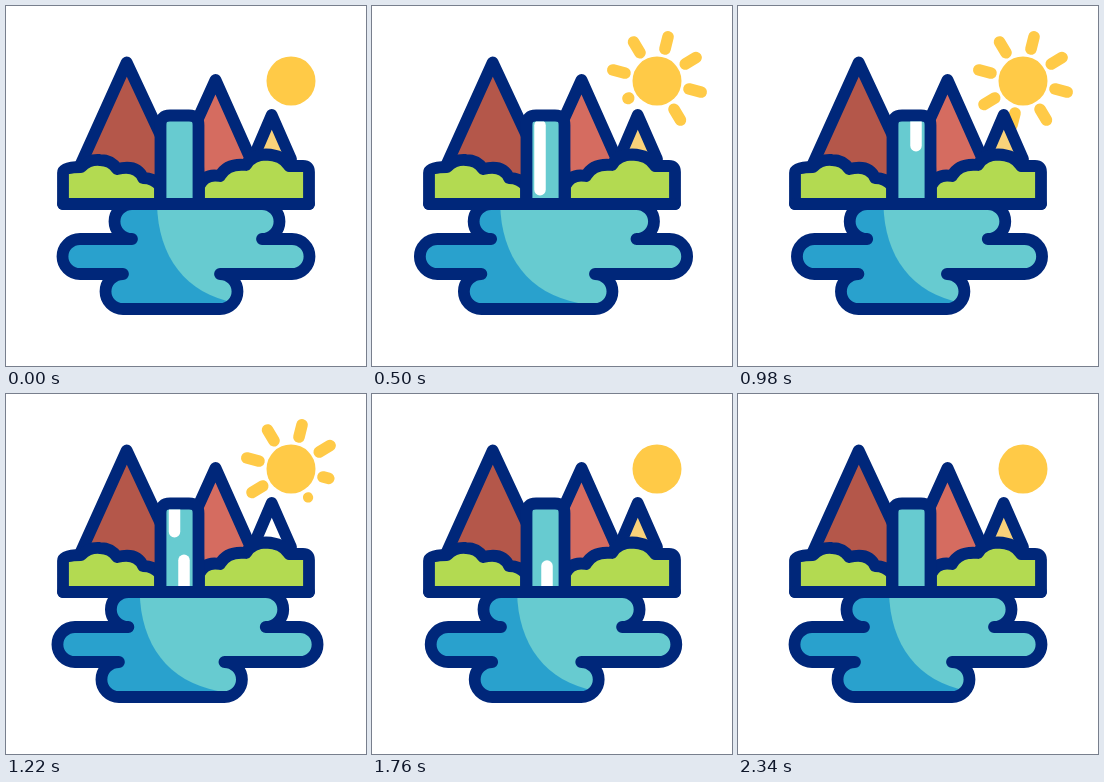
Recreate the animation shown at these times as an HTML page. Size 360 by 360 pixels, loop 2.4 s.

```html
<!DOCTYPE html>
<html lang="en">
<head>
<meta charset="utf-8">
<title>Waterfall</title>
<style>
  html, body { margin: 0; width: 100%; height: 100%; overflow: hidden; background: #fff; }
  svg { display: block; width: 100vw; height: 100vh; }
  .line { stroke: #00277a; stroke-width: 11.8; stroke-linecap: round; stroke-linejoin: round; }
</style>
</head>
<body>
<svg viewBox="0 0 360 360">
  <defs>
    <clipPath id="lake"><path id="lakeClip"/></clipPath>
    <clipPath id="fall"><rect x="160.500" y="115.500" width="26" height="77" rx="3"/></clipPath>
  </defs>
  <g id="sun" stroke="#ffca47" stroke-linecap="round">
    <circle cx="285" cy="75" r="24.5" fill="#ffca47" stroke="none"/>
  </g>
  <g class="line">
    <path fill="#b4574a" d="M74 160 120.700 56.500 155 130V185Z"/>
    <path fill="#d56c60" d="M190.500 116 209.500 74 246 156 193 185Z"/>
    <path id="peak" d="M246 155 265.700 109 285 153Z"/>
    <path fill="#b3da51" d="M57 198V167Q57 161 75 161Q83 153 94 154Q105 154 111 163Q131 158 137 172Q148 172 154 180V198Z"/>
    <path fill="#b3da51" d="M193 198V180Q199 167 214 170Q221 157 240 159Q246 148.500 260 148.500Q277 149 283 160H297Q303 160 303 166V198Z"/>
    <path fill="#67cbd0" d="M154.500 198V119Q154.500 109.500 164 109.500H183Q192.500 109.500 192.500 119V198Z"/>
  </g>
  <g id="streaks" clip-path="url(#fall)" stroke="#fff" stroke-width="11.500" stroke-linecap="round"></g>
  <g clip-path="url(#lake)">
    <rect x="30" y="190" width="300" height="120" fill="#29a1cd"/>
    <path id="light" fill="#67cbd0"/>
  </g>
  <path id="shore" class="line" fill="none"/>
  <path class="line" d="M57 198H303"/>
</svg>
<script>
const LOOP = 2400;
const $ = id => document.getElementById(id);
const clamp = v => Math.max(0, Math.min(1, v));
const smooth = v => (1 - Math.cos(Math.PI * clamp(v))) / 2;

function addLine(parent) {
  const line = document.createElementNS('http://www.w3.org/2000/svg', 'line');
  return parent.appendChild(line);
}
function setAttrs(el, attrs) {
  for (const name in attrs) el.setAttribute(name, attrs[name]);
}

const rays = Array.from({ length: 8 }, () => addLine($('sun')));
// x, start time, length
const streaks = [[168, 305, 76], [174.5, 565, 76], [178, 901, 76], [168.5, 1146, 76], [175, 1389, 90]]
  .map(([x, start, length]) => ({ x, start, length, el: addLine($('streaks')) }));

function drawLake(t) {
  const active = smooth(t / 200) * smooth((2000 - t) / 200);
  const wave = t > 200 && t < 1800 ? 4 + 6.5 * Math.cos((t - 600) * Math.PI / 400) : -2.5 * active;
  const rest = 1 - active;
  const at = (x, slope, offset) => x + slope * wave + offset * rest;
  const topL = at(127, -0.91, -1), topR = at(253, 1.33, 3);
  const midL = at(74, -1, 0), midR = at(289, 1, -3);
  const lowL = at(118, -1, -1), lowR = at(212, 1.27, 2);
  const cap = (x, y, sweep) => `A17.5 17.5 0 0 ${sweep} ${x} ${y}`;
  const d = `M${topL} 198${cap(topL, 233, 0)}H${midL}${cap(midL, 268, 0)}H${lowL}${cap(lowL, 303, 0)}` +
    `H${lowR}${cap(lowR, 268, 0)}H${midR}${cap(midR, 233, 0)}H${topR}${cap(topR, 198, 0)}Z`;
  $('shore').setAttribute('d', d);
  $('lakeClip').setAttribute('d', d);
  const edge = at(141.6, -1.56, 9.4);
  $('light').setAttribute('d', `M${edge} 195C${edge} 250 ${edge + 28} 287 ${edge + 78} 297H340V195Z`);
}

function drawRays(t) {
  const spin = -84 * clamp((t - 1220) / 340) ** 2;
  rays.forEach((el, i) => {
    const grow = clamp((t - 60 - 70 * i) / 80);
    const end = Math.min(1580, 1170 + 70 * ((i + 1) % 8));
    const size = Math.min(grow, clamp((end - t) / 130));
    setAttrs(el, {
      x1: 33, x2: 33.01 + 12.5 * size * size,
      'stroke-width': 11.6 * Math.min(1, 6 * size),
      visibility: size > 0 ? 'visible' : 'hidden',
      transform: `translate(285 75) rotate(${59 - 45 * i + spin})`
    });
  });
}

function drawStreaks(t) {
  for (const { x, start, length, el } of streaks) {
    const bottom = 115 + (t - start) * 0.38;
    setAttrs(el, {
      x1: x, x2: x, y1: bottom - length + 5.75, y2: bottom - 5.75,
      visibility: t > start ? 'visible' : 'hidden'
    });
  }
}

function frame(now) {
  const t = now % LOOP;
  drawLake(t);
  drawRays(t);
  drawStreaks(t);
  $('peak').setAttribute('fill', t >= 1180 && t < 1260 ? '#fff' : '#fad27a');
  requestAnimationFrame(frame);
}
frame(0);
</script>
</body>
</html>
```
